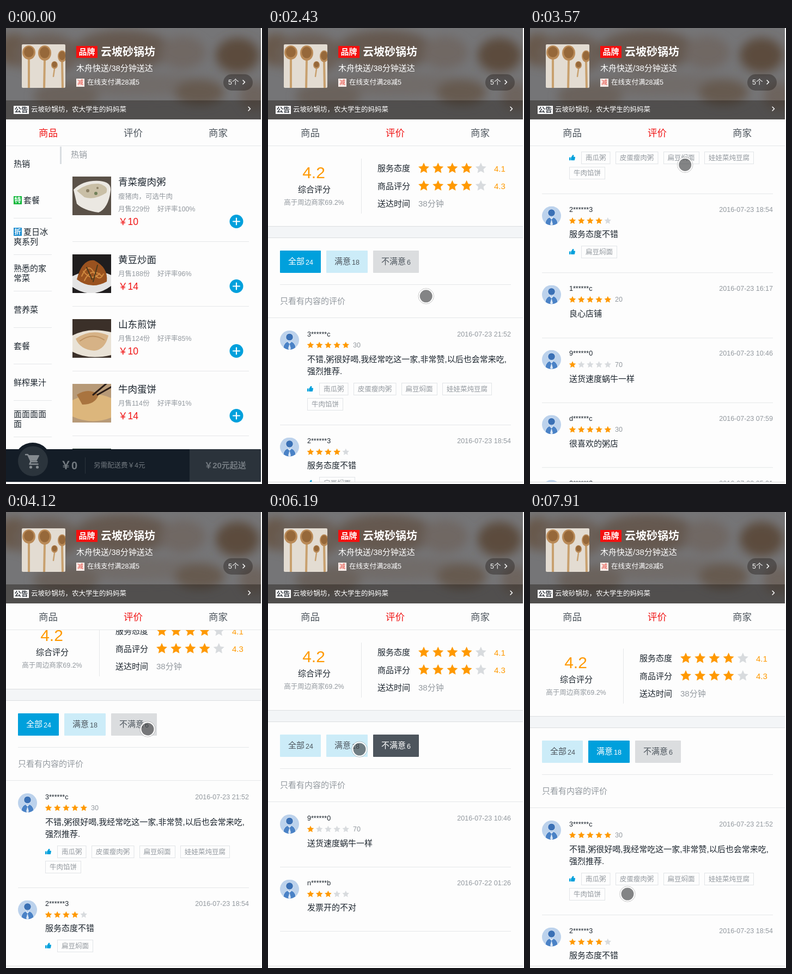
Animation, 470 px wide and 838 px high, one loop 8 s. Source, as an HTML page:

```html
<!DOCTYPE html>
<html lang="zh-CN">
<meta charset="utf-8">
<style>
html, body { margin: 0; width: 100%; height: 100%; overflow: hidden; background: #fff }
svg { display: block; font: 300 15px "Liberation Sans", Arial, "Noto Sans CJK SC", "Noto Sans CJK", sans-serif }
</style>
<body>
<svg id="stage" width="470" height="838" viewBox="0 0 470 838"></svg>
<script>
const INK = '#1c252e', GREY = '#93999f', SLATE = '#4d555d', RED = '#f01414',
  BLUE = '#00a0dc', GOLD = '#ff9900', LINE = '#e5e7e9', PAPER = '#fdfdfd';

// Shape helpers; text is placed by its vertical centre
const text = (s, x, y, size = 15, fill = INK, extra = '') =>
  `<text x="${x}" y="${y + size * .36}" font-size="${size}" fill="${fill}" ${extra}>${s}</text>`;
const MID = 'text-anchor="middle"', END = 'text-anchor="end"', BOLD = 'font-weight="700"';
const rect = (x, y, w, h, fill, extra = '') =>
  `<rect x="${x}" y="${y}" width="${w}" height="${h}" fill="${fill}" ${extra}/>`;
const oval = (x, y, rx, ry, fill, extra = '') =>
  `<ellipse cx="${x}" cy="${y}" rx="${rx}" ry="${ry}" fill="${fill}" ${extra}/>`;
const dot = (x, y, r, fill, extra) => oval(x, y, r, r, fill, extra);
const path = (d, stroke, w = 1, fill = 'none') =>
  `<path d="${d}" fill="${fill}" stroke="${stroke}" stroke-width="${w}" stroke-linecap="round" stroke-linejoin="round"/>`;
const shape = (d, fill) => path(d, 'none', 0, fill);
const rule = (x, y, w) => rect(x, Math.round(y), w, 1, LINE);

function star(x, y, r, on) {
  const points = [...Array(10)].map((_, i) => {
    const a = i * Math.PI / 5, q = i % 2 ? r * .48 : r;
    return [x + q * Math.sin(a), y - q * Math.cos(a)].map(v => v.toFixed(2));
  });
  return `<polygon points="${points.join(' ')}" fill="${on ? GOLD : '#d8dbde'}"/>`;
}
const stars = (n, x, y, r, gap) =>
  [0, 1, 2, 3, 4].map(i => star(x + i * gap, y, r, i < n)).join('');

function header() {
  const blobs = [[15, 40, 30, 30, '#67584c'], [75, 48, 60, 38, '#6a5f57'], [215, 40, 90, 36, '#65594f'],
    [325, 45, 42, 30, '#6f6864'], [425, 50, 40, 32, '#5c4b3e'], [240, 105, 130, 22, '#716c69'],
    [110, 125, 60, 26, '#6b625b'], [355, 118, 46, 24, '#665a50'], [455, 125, 26, 26, '#6d645d']];
  const spoons = [[42, 45, 12, 13, 42], [71, 46, 12, 14, 70], [89, 68, 6, 7, 87], [103, 52, 8, 11, 104]];
  return rect(0, 0, 468, 168, '#757577') +
    `<g clip-path="url(#top)"><g filter="url(#blur)">` +
    blobs.map(b => oval(...b)).join('') + '</g></g>' +
    rect(29, 30, 80, 80, '#e3dcd2', 'rx="2"') +
    `<g clip-path="url(#photo)">` +
    spoons.map(([x, y, rx, ry, tail], i) =>
      path(`M${x} ${y + ry}L${tail} ${i == 2 ? 89 : 112}`, '#c8a06e', i == 2 ? 2.5 : 4) +
      oval(x, y, rx, ry, '#b98a58') + oval(x, y - 1, rx * .75, ry * .75, '#96683a')).join('') + '</g>' +
    rect(129, 33, 39, 22, '#f5100f') + text('品牌', 148.5, 44, 15, '#fff', MID + BOLD) +
    text('云坡砂锅坊', 174, 44, 20, '#fff', BOLD) +
    text('木舟快送/38分钟送达', 129, 74, 15, '#fff') +
    rect(129, 93, 15, 15, '#fbeeea') + text('减', 136.5, 100.5, 11, '#e2453c', MID) +
    text('在线支付满28减5', 149, 99.5, 12.5, '#fff') +
    rect(399, 85, 54, 30, '#120c08', 'rx="15" opacity=".33"') +
    text('5个', 408, 99.5, 12.5, '#fff') + path('M435 96l3.5 3.5-3.5 3.5', '#fff', 1.5) +
    rect(0, 133, 468, 35, '#120c08', 'opacity=".36"') +
    rect(14, 143, 28, 15, '#fff') + text('公告', 28, 150.5, 12.5, '#3c4148', MID + BOLD) +
    text('云坡砂锅坊，农大学生的妈妈菜', 46, 149, 12.5, '#fff') +
    path('M445 145l3.5 3.5-3.5 3.5', '#fff', 1.5);
}

const tabs = active => rect(0, 168, 468, 49, PAPER) + rule(0, 216, 468) +
  ['商品', '评价', '商家'].map((s, i) =>
    text(s, 77.5 + 156 * i, 193, 17.5, i == active ? RED : SLATE, MID)).join('');

const MENU = ['热销', '套餐', '夏日冰|爽系列', '熟悉的家|常菜', '营养菜', '套餐', '鲜榨果汁', '面面面面|面'];
// name, sold, rating, price, then the picture: backdrop and layered shapes
const FOODS = [
  ['青菜瘦肉粥', 229, 100, 10, '#5a5148',
    shape('M2 24Q20 6 50 8Q72 10 70 26Q66 58 48 66Q20 62 8 50Z', '#ebe8e2') +
    shape('M8 26Q26 12 48 13Q68 18 62 30Q40 44 22 38Z', '#c9bfa6') +
    dot(28, 26, 3, '#8b8065') + dot(43, 31, 3, '#71805a') + dot(46, 21, 2, '#8b8065')],
  ['黄豆炒面', 188, 96, 14, '#1f1d1e',
    shape('M0 40Q36 22 71 38V58Q36 84 0 60Z', '#e4e4e4') +
    shape('M8 46Q18 8 40 11Q66 24 63 50Q34 66 8 46Z', '#9a521f') +
    path('M17 40q12-26 22-7t18 3M20 31q15 20 30 4M22 48q12-25 31-9', '#d08a40', 2) +
    path('M26 24l10 22M46 20l-8 30', '#4a3a1c', 2)],
  ['山东煎饼', 124, 85, 10, '#3b3029',
    shape('M0 30Q30 14 71 24V66Q30 76 0 60Z', '#e9e2d6') +
    shape('M6 36Q34 16 66 30Q60 56 40 58Q14 56 6 36Z', '#d6b286') +
    path('M14 40Q36 24 58 38', '#bd9262', 2)],
  ['牛肉蛋饼', 114, 91, 14, '#b79a78',
    shape('M0 30Q36 10 71 26V62Q36 76 0 60Z', '#dcb67c') +
    shape('M8 20Q30 6 48 20Q42 38 18 38Z', '#a9743f') +
    path('M38 20L64 -2M46 20L74 4', '#2a1d18', 3)],
  ['', 0, 0, 0, '#27382f', '']];

function goods() {
  const menu = MENU.map((s, i) => {
    const y = 250 + 67 * i - (i == 0 ? .5 : 0), lines = s.split('|');
    const tag = { 1: ['特', '#0eb83a'], 2: ['折', '#1f8fd1'] }[i];
    const top = y - (lines.length - 1) * 9;
    return lines.map((l, k) => text(l, tag && !k ? 32 : 14, top + 18 * k)).join('') +
      (tag ? rect(14, top - 8, 15, 15, tag[1]) + text(tag[0], 21.5, top - .5, 12.5, '#fff', MID + BOLD) : '') +
      (i ? rule(14, 282 + 67 * i, 70) : '');
  }).join('');
  const list = FOODS.map(([name, sold, rate, price, back, dish], i) => {
    const y = i ? 297 + 119 * i : 273, d = i ? 0 : 24;
    const thumb = `<svg x="122" y="${y}" width="71" height="71">${rect(0, 0, 71, 71, back)}${dish}</svg>`;
    if (!name) return thumb;
    const py = y + 58.5 + d;
    return thumb + text(name, 206, y + 10, 17.5) +
      (i ? '' : text('瘦猪肉，可选牛肉', 206, y + 36, 12.5, GREY)) +
      text(`月售${sold}份`, 206, y + 35 + d, 12.5, GREY) +
      text(`好评率${rate}%`, 278, y + 35 + d, 12.5, GREY) +
      text('￥' + price, 206, py, 17.5, RED) +
      dot(423, py, 12.5, BLUE) + path(`M417 ${py}h12m-6 -6v12`, '#fff', 2.2) +
      rule(122, y + 95 + d, 324);
  }).join('');
  const dim = '#737a80';
  return menu + rect(99, 218, 3, 32, '#d9dde1') + text('热销', 119, 233, 15, GREY) + list +
    dot(49, 796, 34, '#141d27') + rect(0, 774, 468, 60, '#141d27') + rect(337, 774, 131, 60, '#2b333b') +
    dot(49.5, 796, 27.5, '#2b343c') +
    path('M36 784h4l6 13h11', '#858b90', 2.5) + path('M42 786h18l-4.500 8.500h-10z', '#858b90', 2, '#858b90') +
    path('M45.500 797l-2 4.500h15', '#858b90', 2.5) + dot(45.5, 807, 2.6, '#858b90') + dot(57.5, 807, 2.6, '#858b90') +
    text('￥0', 100, 804, 20, dim, BOLD) + rect(145, 789, 1, 30, '#2b333b') +
    text('另需配送费￥4元', 161, 803.5, 12.5, dim) + text('￥20元起送', 402.5, 804, 15, dim, MID + BOLD);
}

// user, date, stars, minutes, lines, rows of tags
const REVIEWS = [
  ['3******c', '07-23 21:52', 5, 30, ['不错,粥很好喝,我经常吃这一家,非常赞,以后也会常来吃,', '强烈推荐.'],
    [['南瓜粥', '皮蛋瘦肉粥', '扁豆焖面', '娃娃菜炖豆腐'], ['牛肉馅饼']]],
  ['2******3', '07-23 18:54', 4, '', ['服务态度不错'], [['扁豆焖面']]],
  ['1******c', '07-23 16:17', 5, 20, ['良心店铺'], []],
  ['9******0', '07-23 10:46', 1, 70, ['送货速度蜗牛一样'], []],
  ['d******c', '07-23 07:59', 5, 30, ['很喜欢的粥店'], []],
  ['2******3', '07-23 05:01', 4, '', ['量给的还可以'], []],
  ['n******b', '07-22 01:26', 3, '', ['发票开的不对'], []]];

const avatar = y => `<svg x="22" y="${y}" width="35" height="35" viewBox="0 0 35 35">` +
  dot(17.5, 17.5, 17.5, '#bcd2ec') + `<g clip-path="url(#face)">` +
  oval(17.5, 32, 11.5, 12.5, '#4a82c6', 'stroke="#dce8f6"') + dot(17.5, 12, 6.8, '#3a70b5', 'stroke="#dce8f6"') +
  shape('M13.500 20.500l4 4 4-4z', '#dce8f6') + shape('M17.500 24l-2.500 9 2.500 3 2.500-3z', '#dce8f6') + '</g></svg>';

function review([user, date, score, mins, lines, tagRows], y) {
  const shift = mins ? 0 : -1.6, ty = y + 75.5 + shift;
  let out = avatar(y + 23) + text(user, 72, y + 29, 12.5) + text('2016-' + date, 446, y + 29, 12.5, GREY, END) +
    stars(score, 78, y + 50, 6.6, 16.2) + text(mins, 156, y + 49.5, 12.5, GREY) +
    lines.map((l, i) => text(l, 72, ty + 22 * i)).join('');
  const gy = ty + 22 * lines.length + 11;
  tagRows.forEach((row, r) => {
    let x = r ? 72 : 94;
    const cy = gy + 28 * r;
    if (!r) out += rect(72, cy - 1, 2.5, 5.5, BLUE) +
      path(`M76 ${cy - 1}l3-4.500 1 1-.5 3h3l-1 5.500h-5.500z`, BLUE, 1, BLUE);
    row.forEach(tag => {
      const w = tag.length * 12.5 + 15;
      out += rect(Math.round(x) + .5, Math.round(cy - 11.5) + .5, w, 22, 'none', 'stroke="#e1e4e7"') +
        text(tag, x + 8, cy, 12.5, GREY);
      x += w + 10.3;
    });
  });
  const n = tagRows.length;
  const bottom = y + 119.4 + shift + 22 * (lines.length - 1) + (n ? 28 * n - 1 : 0);
  return [out + rule(22, bottom, 424), bottom];
}

function ratings(loaded, filter) {
  let x = 22, y = 533;
  const buttons = [['全部', 24], ['满意', 18], ['不满意', 6]].map(([label, total], i) => {
    const count = String(loaded ? total : 0), on = i == filter, words = label.length * 15;
    const left = Math.floor(x), right = x + words + 31.8 + count.length * 7;
    x = right + 10;
    const fill = on ? (i == 2 ? SLATE : BLUE) : (i == 2 ? '#dbdddf' : '#ccecf8');
    const ink = on ? '#fff' : SLATE, weight = on ? 'font-weight="500"' : '';
    return rect(left, 409, Math.floor(right) - left, 41, fill, 'rx="1"') +
      text(label, left + 15, 429, 15, ink, weight) +
      text(count, left + words + 17, 430, 12.5, ink, weight);
  }).join('');
  const rows = [['服务态度', 4.1], ['商品评分', 4.3]].map(([label, v], i) => {
    const cy = 258 + 32.3 * i;
    return text(label, 201, cy) + stars(4, 286, cy, 10.5, 26.2) + text(v, 415, cy + .5, 15, GOLD);
  }).join('');
  const list = !loaded ? '' : REVIEWS.filter(r => !filter || (r[2] > 3) == (filter == 1)).map(r => {
    const [markup, next] = review(r, y);
    y = next;
    return markup;
  }).join('');
  return text('4.2', 84, 265, 30, GOLD, MID) + text('综合评分', 85, 297, 15, INK, MID) +
    text('高于周边商家69.2%', 84.5, 320, 12.5, GREY, MID) + rect(171, 240, 1, 101, LINE) + rows +
    text('送达时间', 201, 322.5) + text('38分钟', 276, 322.5, 15, GREY) +
    rect(0, 364, 468, 22, '#f3f5f7') + rect(0, 364, 468, 1, '#dcdee0') + rect(0, 385, 468, 1, '#dcdee0') +
    buttons + rule(22, 471, 424) + text('只看有内容的评价', 22, 501.5, 15, GREY) + rule(0, 532, 468) + list;
}

const clip = (id, area) => `<clipPath id="${id}">${area}</clipPath>`;
stage.innerHTML = '<defs><filter id="blur"><feGaussianBlur stdDeviation="9"/></filter>' +
  clip('top', rect(0, 0, 468, 168, '#000')) + clip('photo', rect(29, 30, 80, 80, '#000')) +
  clip('face', dot(17.5, 17.5, 17.5, '#000')) + clip('view', rect(0, 217, 468, 617, '#000')) + '</defs>' +
  rect(0, 0, 468, 834, PAPER) + header() + '<g id="bar"></g><g clip-path="url(#view)"><g id="page"></g></g>' +
  rect(0, 834, 468, 1, '#d9d9d9') + '<g id="touch">' +
  dot(0, 0, 14.2, 'none', 'stroke="#999" stroke-width=".6"') +
  dot(0, 0, 12.5, 'rgba(50,52,54,.6)', 'stroke="#fff" stroke-width="2"') + '</g>';

// The screen refreshes in bursts: first time, last time, number of steps
const BURSTS = [[280, 670, 4], [970, 970, 1], [1280, 1280, 1], [1710, 2740, 8], [2890, 3020, 2], [3170, 3840, 5],
  [3970, 4120, 2], [4270, 4840, 5], [5120, 5670, 5], [5940, 6190, 3], [6340, 6460, 2], [6760, 7150, 4],
  [7310, 7760, 4], [7910, 7910, 1]];
const TICKS = [0, ...BURSTS.flatMap(([a, b, n]) =>
  [...Array(n)].map((_, i) => Math.round(a + (n > 1 ? (b - a) * i / (n - 1) : 0))))];
const FINGER = [[280, 206, 283], [540, 230, 212], [670, 221, 191], [970, 232, 191], [1280, 232, 191],
  [1710, 236, 215], [2590, 317, 630], [2740, 314, 615], [3020, 303, 421], [3170, 296, 310], [3500, 285, 250],
  [3840, 268, 350], [4120, 260, 399], [4840, 230, 640], [5120, 230, 700], [5530, 214, 394], [5670, 230, 430],
  [5940, 232, 430], [6190, 168, 436], [6460, 150, 432], [6760, 240, 445], [7150, 249, 84], [7310, 246, 60],
  [7610, 200, 470], [7760, 185, 640], [7910, 179, 702]];
const SCROLL = [[2740, 0], [3020, 194], [3170, 305], [3500, 430], [3840, 75], [3970, 42], [4120, 39], [4600, 0],
  [6760, 0], [7150, 361], [7310, 400], [7460, 330], [7610, 120], [7760, 6], [7910, -11]];

function at(keys, t) {
  const i = keys.findIndex(k => k[0] > t);
  if (i == 0) return keys[0].slice(1);
  if (i < 0) return keys[keys.length - 1].slice(1);
  const a = keys[i - 1], b = keys[i], p = (t - a[0]) / (b[0] - a[0]);
  return a.slice(1).map((v, k) => v + (b[k + 1] - v) * p);
}

let shown;
function draw(now) {
  const time = now % 8000, t = TICKS.filter(v => v <= time).pop();
  const tab = t < 1280 ? 0 : 1, loaded = t >= 1710, filter = t < 5940 ? 0 : t < 6460 ? 2 : 1;
  const state = [tab, loaded, filter].join();
  if (state != shown) {
    shown = state;
    bar.innerHTML = tabs(tab);
    page.innerHTML = tab ? ratings(loaded, filter) : goods();
  }
  page.setAttribute('transform', `translate(0 ${-at(SCROLL, t)[0]})`);
  touch.setAttribute('transform', `translate(${at(FINGER, t)})`);
  touch.setAttribute('visibility', t < 280 ? 'hidden' : 'visible');
  requestAnimationFrame(draw);
}
requestAnimationFrame(draw);
</script>
</body>
</html>
```
